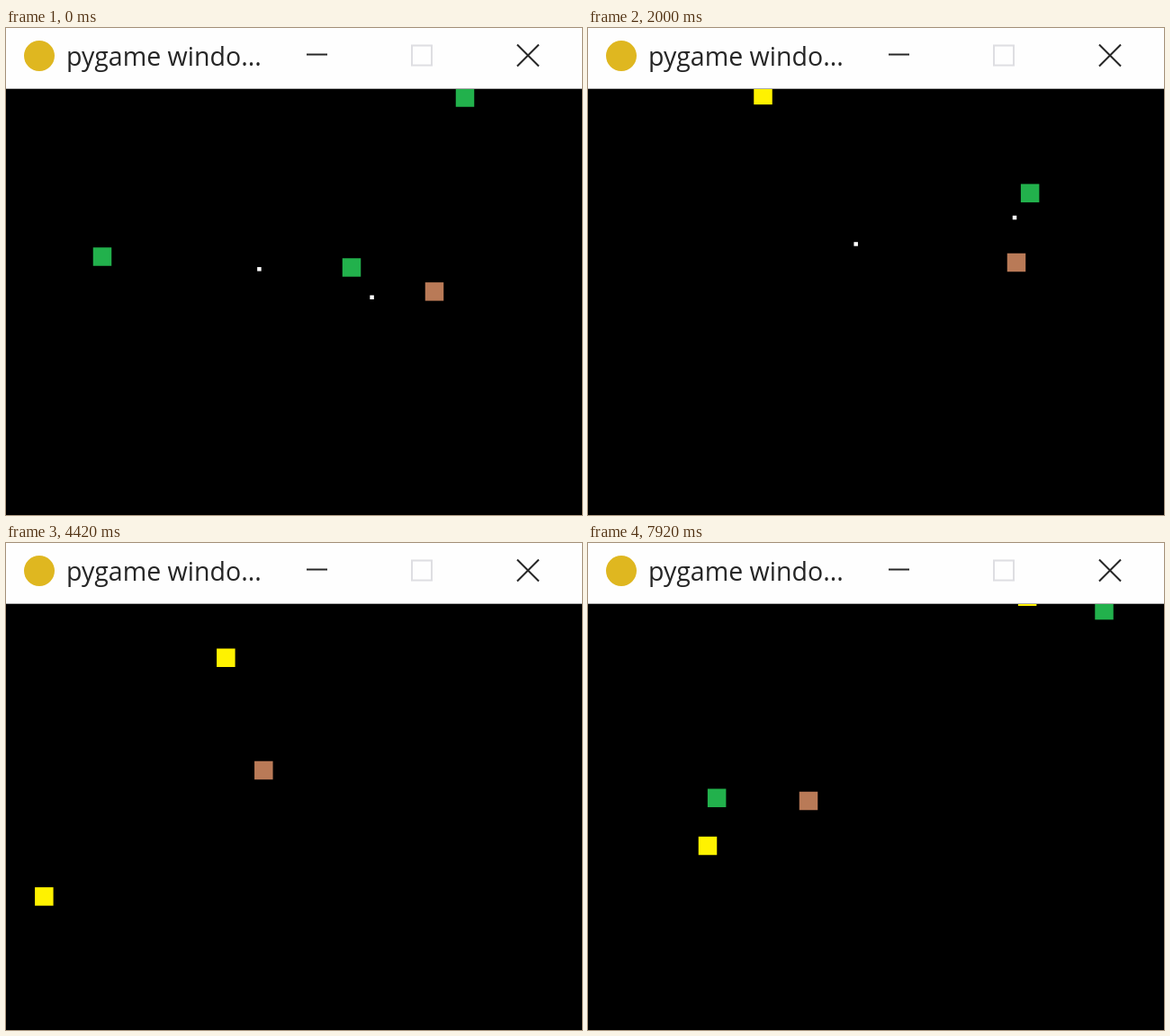
An HTML page for the animation above (8 s loop, 640x542 px).

```html
<!DOCTYPE html>
<html lang="en">
<head>
<meta charset="utf-8">
<title>pygame window</title>
<style>
  html, body { margin: 0; width: 100%; height: 100%; overflow: hidden; background: #000; }
  svg { display: block; width: 100%; height: 100%; }
  text { font: 28.5px "Open Sans", "Noto Sans", sans-serif; fill: #262626; }
</style>
</head>
<body>
<svg viewBox="0 0 640 542">
  <rect width="640" height="542"/>
  <g id="field"></g>
  <g fill="none" stroke="#262626" stroke-width="2">
    <rect width="640" height="68" fill="#fefefe" stroke="none"/>
    <path d="M0 67.5H640" stroke="#aaa" stroke-width="1"/>
    <circle cx="37" cy="31" r="17" fill="#dfb720" stroke="none"/>
    <text x="67" y="41.5" stroke="none">pygame windo...</text>
    <path d="M334 29.5H357"/>
    <rect x="451" y="19.5" width="22" height="22" stroke="#dedee2"/>
    <path d="M568 18.5L592 42.5M592 18.5L568 42.5"/>
  </g>
</svg>
<script>
const LOOP = 8000, STEPS = 96, PREROLL = 8, DT = 1 / 8;
const BLOCK = 20.5, DOT = 4.5, MUZZLE = 4;
const SHOT_SPEED = 28.8, PLAYER_SPEED = 8.6;
const GREEN = { fill: '#22b14c', speed: 4.5 };
const YELLOW = { fill: '#fff200', speed: 2.55 };

// The script of the round: when something happens and where.
const spawn = (step, kind, x, y) => ({ step, kind, x, y });
const at = (step, x, y) => ({ step, x, y });

const spawns = [
  spawn(0, GREEN, 107, 254.5), spawn(0, GREEN, 384, 266.5), spawn(0, GREEN, 510, 77.5),
  spawn(12, YELLOW, 169, 58), spawn(31, YELLOW, -10, 413), spawn(61, GREEN, -8, 302),
  spawn(88, GREEN, 600, 58), spawn(94, YELLOW, 490, 58),
];
const goals = [at(-2.75, 476, 293), at(9.75, 476, 261), at(30.5, 368, 287),
  at(43.5, 243, 253), at(82, 245, 287)];
const clicks = [at(-7, 282, 268.5), at(-2.5, 45, 200), at(0.25, 396, 270), at(1.5, 160, 261),
  at(17.75, 298, 240.5), at(22.125, 474, 210.5), at(26.75, 490, 195),
  at(60.75, 229, 134.5), at(65.25, 245.5, 156)];

const toward = (a, b, limit) => a + Math.max(-limit, Math.min(limit, b - a));

function heading(from, to, speed) {
  const d = Math.hypot(to.x - from.x, to.y - from.y) || 1;
  return { vx: (to.x - from.x) / d * speed, vy: (to.y - from.y) / d * speed };
}

function advance(body, { vx, vy }) {
  body.x += vx * DT;
  body.y += vy * DT;
}

const touches = (a, b) => Math.max(Math.abs(a.x - b.x), Math.abs(a.y - b.y)) < BLOCK / 2;

// Plays the round once and keeps one list of squares per step.
function playRound() {
  const player = { x: 476, y: 317, fill: '#b97a57', size: BLOCK };
  const frames = [];
  let goal = player, enemies = [], shots = [];

  for (let n = -PREROLL; n < STEPS; n += DT) {
    const due = list => list.filter(e => e.step === n);
    for (const g of due(goals)) goal = g;
    for (const { kind, x, y } of due(spawns)) enemies.push({ x, y, ...kind, size: BLOCK });
    for (const aim of due(clicks)) {
      const muzzle = { x: player.x, y: player.y + MUZZLE };
      shots.push({ ...muzzle, ...heading(muzzle, aim, SHOT_SPEED), fill: '#fff', size: DOT });
    }

    if (n >= 0 && Number.isInteger(n)) {
      frames.push([...enemies, ...shots, player].map(({ x, y, size, fill }) => ({ x, y, size, fill })));
    }

    player.x = toward(player.x, goal.x, PLAYER_SPEED * DT);
    player.y = toward(player.y, goal.y, PLAYER_SPEED * DT);
    for (const e of enemies) advance(e, heading(e, player, e.speed));
    for (const s of shots) advance(s, s);

    const hits = enemies.filter(e => shots.some(s => touches(e, s)));
    shots = shots.filter(s => !hits.some(e => touches(e, s)));
    enemies = enemies.filter(e => !hits.includes(e));
  }
  return frames;
}

const field = document.getElementById('field');
const frames = playRound();

function draw(ms) {
  // Steps are timed to 10 ms, so some begin slightly early.
  const n = Math.min(STEPS - 1, Math.floor((ms % LOOP + 3.5) * STEPS / LOOP));
  field.innerHTML = frames[n].map(({ x, y, size, fill }) =>
    `<rect x="${x - size / 2}" y="${y - size / 2}" width="${size}" height="${size}" fill="${fill}"/>`
  ).join('');
}

const begin = performance.now();
function tick() {
  draw(performance.now() - begin);
  requestAnimationFrame(tick);
}
tick();
</script>
</body>
</html>
```
